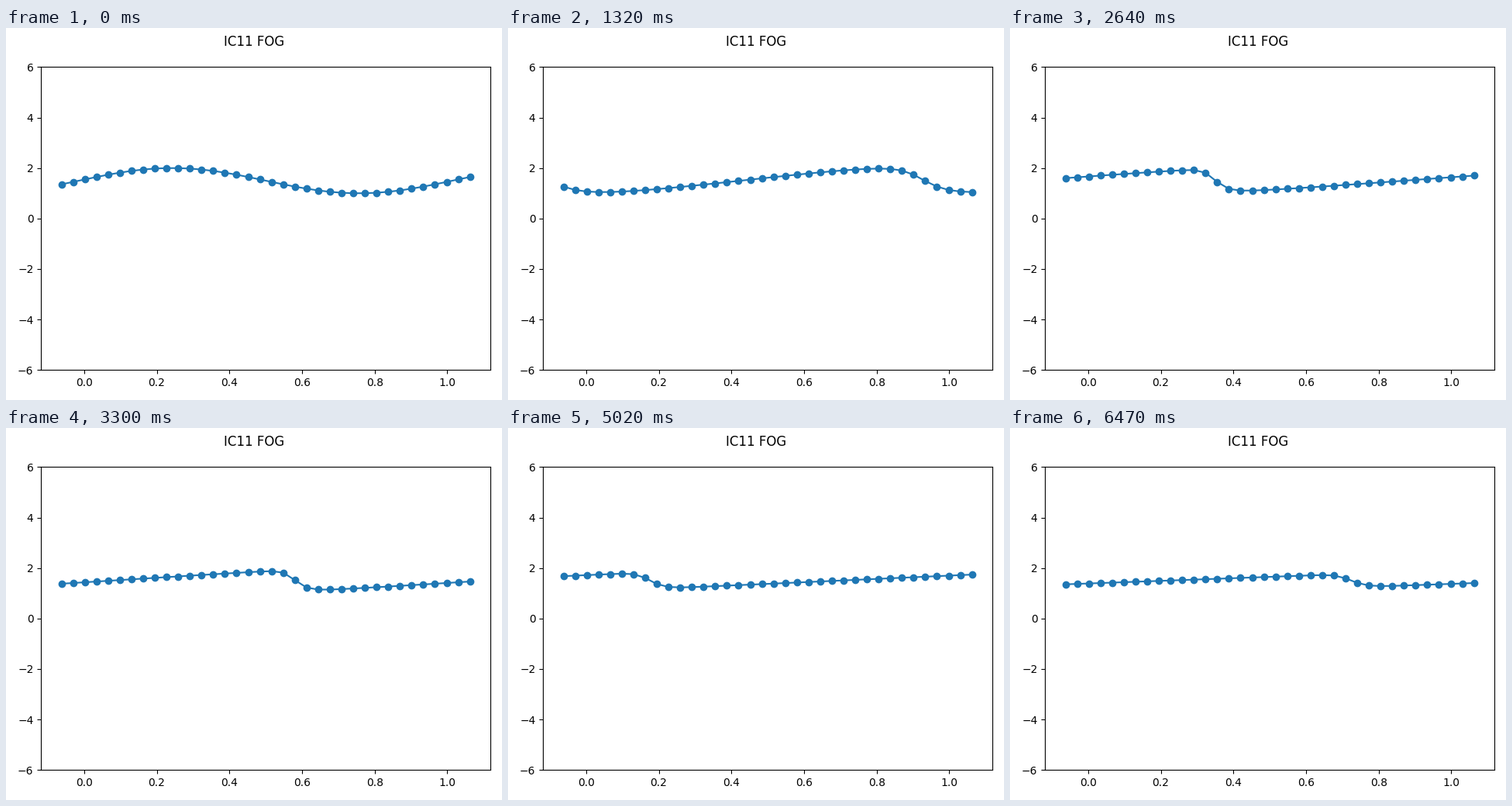
A matplotlib script that plays this animation: 640x480 px, repeating every 6540 ms.

```python
import matplotlib.pyplot as plt
import numpy as np
from matplotlib.animation import FuncAnimation

CELLS = 32
GHOSTS = 2
CFL = 0.9
LOOP_MS = 6540
TICK_MS = 20
STEP_MS = 66

dx = 1 / CELLS


def initial_state():
    centers = (np.arange(CELLS) + 0.5) * dx
    return 1.5 + 0.5 * np.sin(2 * np.pi * centers)


def godunov_step(u):
    """Advance Burgers' equation by one CFL-limited step (u > 0, periodic)."""
    dt = CFL * dx / np.abs(u).max()
    flux = u**2 / 2
    return u - dt / dx * (flux - np.roll(flux, 1))


def solve(steps):
    u = initial_state()
    states = [u]
    for _ in range(steps):
        u = godunov_step(u)
        states.append(u)
    return [np.pad(s, GHOSTS, mode="wrap") for s in states]


states = solve(LOOP_MS // STEP_MS)
x = np.linspace(-GHOSTS * dx, 1 + GHOSTS * dx, CELLS + 2 * GHOSTS)

fig, ax = plt.subplots(figsize=(6.4, 4.8), dpi=100)
fig.suptitle("IC11 FOG", y=0.982)
line, = ax.plot(x, states[0], "-o")
ax.set_ylim(-6, 6)
fig.tight_layout()
fig.subplots_adjust(top=0.895)


def update(tick):
    # The solver steps are held on a fine clock, rounded to the nearest tick.
    step = (tick * TICK_MS + TICK_MS // 2) // STEP_MS
    line.set_ydata(states[step])
    return line,


anim = FuncAnimation(fig, update, frames=LOOP_MS // TICK_MS, interval=TICK_MS,
                     repeat=True, repeat_delay=0)
plt.show()
```
